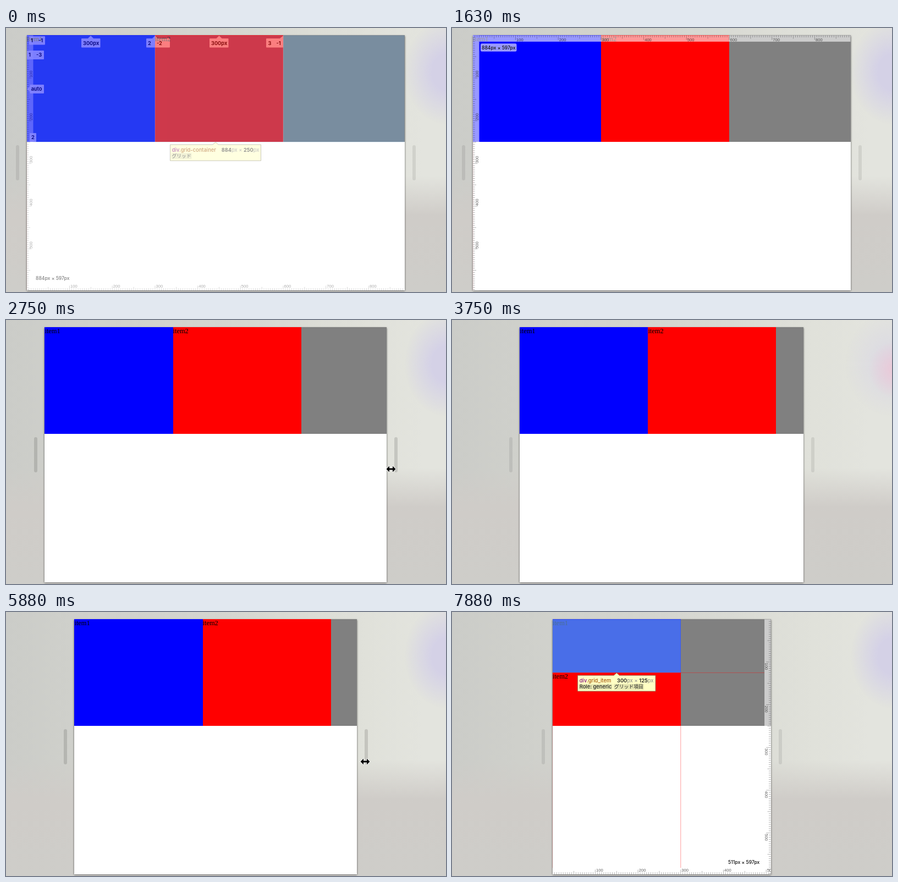
Animation of 800 by 480 pixels, one loop 8 s. Source, as an HTML page:

```html
<!DOCTYPE html>
<html lang="ja">
<head>
<meta charset="utf-8">
<title>Responsive grid</title>
<style>
@property --w { syntax: "<number>"; inherits: true; initial-value: 884; }
html, body { margin: 0; width: 100%; height: 100%; overflow: hidden; }
#stage {
  position: relative; width: 800px; height: 480px; overflow: hidden;
  background:
    linear-gradient(#cfcdc900 56%, #cfccc8 71%, #cecdc9 100%),
    linear-gradient(90deg, #cbccc8 0, #cfd0cb 15%, #d5d6d0 50%, #e0e1da 82%, #e3e4de 95%);
  animation: drag 8s step-end infinite;
}
#stage > * { position: absolute; }
.glow { inset: 0; }
.lilac { background: radial-gradient(75px 95px at 800px 80px, #d4d1e6 35%, #d4d1e600); animation: lilac 8s step-end infinite; }
.pink { background: radial-gradient(48px 52px at 806px 90px, #e8cbd9 20%, #e8cbd900), radial-gradient(85px 95px at 800px 80px, #d9d7e4, #d9d7e400); opacity: 0; animation: pink 8s step-end infinite; }
.page {
  --half: calc(var(--w) * .3885px);
  left: calc(381.25px - var(--half)); top: 13.2px;
  width: calc(var(--half) * 2); height: 463.9px;
  background: #fff; box-shadow: 0 .5px 3px #000a;
  container-type: inline-size; overflow: visible;
}
.grid {
  display: grid; height: 194.3px; overflow: hidden;
  grid-template-columns: 233.1px 233.1px 1fr;
  font: 12.43px/14px "Liberation Serif", serif; color: #000;
}
.a { background: #00f; } .b { background: #f00; } .c { background: gray; }
@container (max-width: 466px) {
  .grid { grid-template-columns: 233.1px 1fr; grid-template-rows: 1fr 1fr; }
  .c { grid-area: 1 / 2 / 3 / 3; }
}
.grip { top: 213px; width: 6px; height: 64px; border-radius: 3px; background: #00000014; animation: grip 8s step-end infinite; }
.left { left: calc(361.6px - var(--w) * .3885px); }
.right { left: calc(395.25px + var(--w) * .3885px); }

svg { display: block; }
#over { left: 0; top: 0; }
.layer { opacity: 0; animation: 8s step-end infinite; }
#grid { animation-name: grid; }
#wide { animation-name: wide; }
#bare { animation-name: bare; }
#body { animation-name: body; }
#item { animation-name: item; }
.strip { fill: #fff; opacity: .6; }
.ticks { fill: none; stroke: #000; stroke-opacity: .38; }
.num { font: 9.8px "Liberation Sans", sans-serif; fill: #000; fill-opacity: .62; }
.fill { fill: #6fa8dc; fill-opacity: .66; }
.guide { fill: none; stroke: #f00; stroke-opacity: .5; }
.lines { fill: none; stroke: #fff; stroke-opacity: .55; }
.tip path { fill: #ffffc4; stroke: #807f62; stroke-width: .8; }
.tip text, .tag { font: 500 9.35px Inter, "Noto Sans CJK JP", sans-serif; }
.tip text { fill: #222; white-space: pre; }
.tip .tn { fill: #881280; } .tip .tc { fill: #a5590d; } .tip .u { fill: #888; font-weight: 400; }
.tip .n { font-weight: 600; }
.tip rect { fill: #000; opacity: .1; }
.size rect { fill: #fff; opacity: .6; }
.size text { font: 500 8.6px Inter, sans-serif; fill: #111; }
.mark { fill: #fff; fill-opacity: .92; }
.tag { font-weight: 600; }

.cursor { visibility: hidden; animation: move 8s step-end infinite; }
.cursor path { fill: #000; stroke: #fff; stroke-width: 1.4; paint-order: stroke; stroke-linejoin: round; }
.arrow { animation: arrow 8s step-end infinite; }
.resize { opacity: 0; animation: resize 8s step-end infinite; }

@keyframes drag {
  0% { --w: 884; } 34.375% { --w: 800; } 35.9375% { --w: 742; } 37.5% { --w: 704; }
  39.0625% { --w: 680; } 40.625% { --w: 668; } 42.1875% { --w: 664; }
  73.4375% { --w: 661; } 75% { --w: 655; } 76.5625% { --w: 647; } 78.125% { --w: 637; }
  79.6875% { --w: 625; } 81.25% { --w: 610; } 82.8125% { --w: 592; } 84.375% { --w: 572; }
  85.9375% { --w: 550; } 87.5% { --w: 531; } 89.0625% { --w: 518; } 90.625%, 100% { --w: 511; }
}
@keyframes move {
  0% { visibility: hidden; }
  25% { visibility: visible; transform: translate(470px, 455px); }
  26.5625% { transform: translate(560px, 395px); visibility: visible; }
  28.125% { transform: translate(655px, 330px); visibility: visible; }
  29.6875% { transform: translate(720px, 285px); visibility: visible; }
  31.25% { transform: translate(742px, 271px); visibility: visible; }
  34.375% { transform: translate(700px, 271px); visibility: visible; }
  35.9375% { transform: translate(678px, 271px); visibility: visible; }
  37.5% { transform: translate(664px, 271px); visibility: visible; }
  39.0625% { transform: translate(656px, 271px); visibility: visible; }
  43.75% { transform: translate(640px, 340px); visibility: visible; }
  45.3125% { transform: translate(605px, 462px); visibility: visible; }
  46.875% { visibility: hidden; }
  62.5% { transform: translate(369px, 437px); visibility: visible; }
  64.0625% { transform: translate(440px, 390px); visibility: visible; }
  65.625% { transform: translate(530px, 335px); visibility: visible; }
  67.1875% { transform: translate(610px, 290px); visibility: visible; }
  68.75% { transform: translate(656px, 272px); visibility: visible; }
  73.4375% { transform: translate(653px, 272px); visibility: visible; }
  75% { transform: translate(649px, 272px); visibility: visible; }
  76.5625% { transform: translate(644px, 272px); visibility: visible; }
  78.125% { transform: translate(638px, 272px); visibility: visible; }
  79.6875% { transform: translate(632px, 272px); visibility: visible; }
  81.25% { transform: translate(625px, 272px); visibility: visible; }
  82.8125% { transform: translate(616.5px, 272px); visibility: visible; }
  84.375% { transform: translate(609px, 272px); visibility: visible; }
  85.9375% { transform: translate(601px, 272px); visibility: visible; }
  87.5% { transform: translate(597px, 272px); visibility: visible; }
  92.1875% { transform: translate(565px, 370px); visibility: visible; }
  93.75% { transform: translate(525px, 464px); visibility: visible; }
  95.3125%, 100% { visibility: hidden; }
}
@keyframes arrow { 0%, 43.75%, 92.1875%, 100% { opacity: 1; } 31.25%, 68.75% { opacity: 0; } 62.5% { opacity: 1; } }
@keyframes resize { 0%, 43.75%, 92.1875%, 100% { opacity: 0; } 31.25%, 68.75% { opacity: 1; } }
@keyframes grip { 0%, 43.75%, 92.1875%, 100% { background: #00000014; } 34.375%, 73.4375% { background: #00000020; } }
@keyframes lilac { 0%, 73.4375%, 100% { opacity: 1; } 45.3125% { opacity: 0; } }
@keyframes pink { 0%, 73.4375%, 100% { opacity: 0; } 45.3125% { opacity: 1; } }
@keyframes grid { 0% { opacity: .52; } 1.5625% { opacity: .8; } 3.125% { opacity: 1; } 9.375%, 100% { opacity: 0; } }
@keyframes wide { 0%, 17.1875%, 100% { opacity: 0; } 9.375% { opacity: 1; } }
@keyframes bare { 0%, 26.5625%, 100% { opacity: 0; } 17.1875% { opacity: 1; } 25% { opacity: .5; } }
@keyframes body { 0%, 65.625%, 100% { opacity: 0; } 50%, 64.0625% { opacity: .5; } 51.5625% { opacity: .93; } }
@keyframes item { 0% { opacity: 0; } 95.3125% { opacity: .5; } 96.875%, 100% { opacity: 1; } }
</style>
</head>
<body>
<div id="stage">
  <div class="glow lilac"></div>
  <div class="glow pink"></div>
  <div class="grip left"></div>
  <div class="grip right"></div>
  <div class="page"><div class="grid">
    <div class="a">item1</div><div class="b">item2</div><div class="c"></div>
  </div></div>
  <svg id="over" width="800" height="480">
    <g id="grid" class="layer"></g>
    <g id="wide" class="layer"></g>
    <g id="bare" class="layer"></g>
    <g id="body" class="layer"></g>
    <g id="item" class="layer"></g>
    <g class="cursor">
      <path class="arrow" d="M0 0V17.5L4 13.8L7 21L10 19.7L7 12.8H12.6Z"/>
      <path class="resize" d="M-8.5 0L-3 -5.5V-1.6H3V-5.5L8.5 0L3 5.5V1.6H-3V5.5Z"/>
    </g>
  </svg>
</div>
<script>
const SCALE = .777, TOP = 13.2, MID = 381.25, H = 597, BAR = 15;

const rect = (cls, x, y, w, h, r = 0) =>
  `<rect class="${cls}" x="${x}" y="${y}" width="${w}" height="${h}" rx="${r}"/>`;
const text = (cls, x, y, s, more = '') => `<text class="${cls}" x="${x}" y="${y}" ${more}>${s}</text>`;
const path = (cls, d) => `<path class="${cls}" d="${d}"/>`;

// Rulers along two sides of a viewport of width w, in page pixels
function rulers(w, right, bottom) {
  let ticks = '', nums = '';
  const len = i => i % 50 ? 5 : i % 100 ? 8 : 11;
  const ex = right ? w : 0, ey = bottom ? H : 0;
  for (let i = 5; i < w; i += 5) ticks += `M${i} ${ey}v${bottom ? -len(i) : len(i)}`;
  for (let i = 5; i < H; i += 5) ticks += `M${ex} ${i}h${right ? -len(i) : len(i)}`;
  for (let i = 100; i < w; i += 100) nums += text('num', i + 2, bottom ? H - 6 : 13.5, i);
  for (let i = 100; i < H; i += 100) {
    const spot = right ? `translate(${w - 13.5} ${i + 2}) rotate(90)` : `translate(13.5 ${i - 1}) rotate(-90)`;
    nums += text('num', 0, 0, i, `transform="${spot}"`);
  }
  return rect('strip', right ? w - BAR : 0, 0, BAR, H)
    + rect('strip', right ? 0 : BAR, bottom ? H - BAR : 0, w - BAR, BAR)
    + path('ticks', ticks) + nums;
}

const view = (w, inner) =>
  `<svg x="${MID - w * SCALE / 2}" y="${TOP}" width="${w * SCALE}" height="${H * SCALE}" viewBox="0 0 ${w} ${H}" preserveAspectRatio="none">${inner}</svg>`;

const size = (x, y, w) =>
  `<g class="size">${rect('', x - 2, y - 10.5, 65.5, 14.5, 2.5)}${text('', x, y, `${w}px × ${H}px`)}</g>`;

const span = (cls, s) => `<tspan class="${cls}">${s}</tspan>`;
const dims = (w, h) => span('n', w) + span('u', 'px × ') + span('n', h) + span('u', 'px');

// Tooltip box with an upward pointer centred on its top edge
function tip(x, y, w, h, inner) {
  const d = `M${x} ${y}h${w / 2 - 5}l5 -4.5l5 4.5h${w / 2 - 5}v${h}h${-w}Z`;
  return `<g class="tip">${path('', d)}${inner}</g>`;
}

function mark(x, y, w, h, tags, pointer = '') {
  const base = y + h / 2 + 3.4;
  return rect('mark', x, y, w, h, 1) + (pointer && path('mark', pointer))
    + tags.map(([s, tx]) => text('tag', tx, base, s)).join('');
}
const up = (x, y) => `M${x - 5} ${y}l5 -5l5 5Z`;

function bodyLayer(w) {
  const left = MID - w * SCALE / 2;
  return view(w, rect('fill', 0, 0, w, 250) + path('guide', `M${w} 250V${H}`) + rulers(w, false, true))
    + size(left + 16.4, 458.2, w)
    + tip(328, 212.3, 106.5, 17.7, text('tn', 331, 224.8, 'body') + text('', 362.8, 224.8, dims(w, 250)));
}

const fillLayer = (id, html) => document.getElementById(id).innerHTML = html;

fillLayer('grid',
  view(884, rect('fill', 0, 0, 884, 250) + path('lines', 'M300 0V250M600 0V250')
    + path('guide', `M0 250V${H}`) + rulers(884, false, true))
  + mark(42, 15, 29, 15.5, [['1', 45], ['-1', 59]])
  + mark(38, 41, 31, 16, [['1', 41], ['-3', 55]])
  + mark(43.5, 103, 25.5, 16, [['auto', 45.5]], 'M43.5 106l-5 5l5 5Z')
  + mark(43, 191, 12, 16, [['2', 46]])
  + mark(137, 19, 34.5, 16.5, [['300px', 140]], up(154, 19))
  + mark(255, 19, 43, 16.5, [['2', 258], ['-2', 274]], up(271, 19))
  + mark(370, 19, 34.5, 16.5, [['300px', 373]], up(387.5, 19))
  + mark(473, 19, 31, 16.5, [['3', 476.5], ['-1', 491.5]], 'M498 19L504 14V19Z')
  + size(54, 458.2, 884)
  + tip(298.5, 212, 165, 29.3,
    rect('', 300.5, 227.5, 37, 10.5, 1)
    + text('', 301.8, 224.8, span('tn', 'div') + span('tc', '.grid-container'))
    + text('', 391.8, 224.8, dims(884, 250))
    + text('', 301.5, 236.4, 'グリッド', 'style="font-size:8.8px"')));

fillLayer('wide', bodyLayer(884));
fillLayer('bare', view(884, path('guide', `M0 250V${H}`) + rulers(884, false, false)) + size(54, 38.8, 884));
fillLayer('body', bodyLayer(664));

fillLayer('item',
  view(511, rect('fill', 0, 0, 300, 125)
    + path('guide', `M300 125V${H - BAR}M0 125V${H - BAR}M300 125H${511 - BAR}`)
    + rulers(511, true, true))
  + size(502, 458.2, 511)
  + tip(228.5, 115.3, 141.5, 28.7,
    rect('', 230.5, 130.7, 61, 10.5, 1) + rect('', 294, 130.7, 55, 10.5, 1)
    + text('', 231.8, 128, span('tn', 'div') + span('tc', '.grid_item'))
    + text('', 300, 128, dims(300, 125))
    + text('', 231.8, 139.3, 'Role: generic')
    + text('', 295, 139.3, 'グリッド項目', 'style="font-size:8.8px"')));
</script>
</body>
</html>
```
